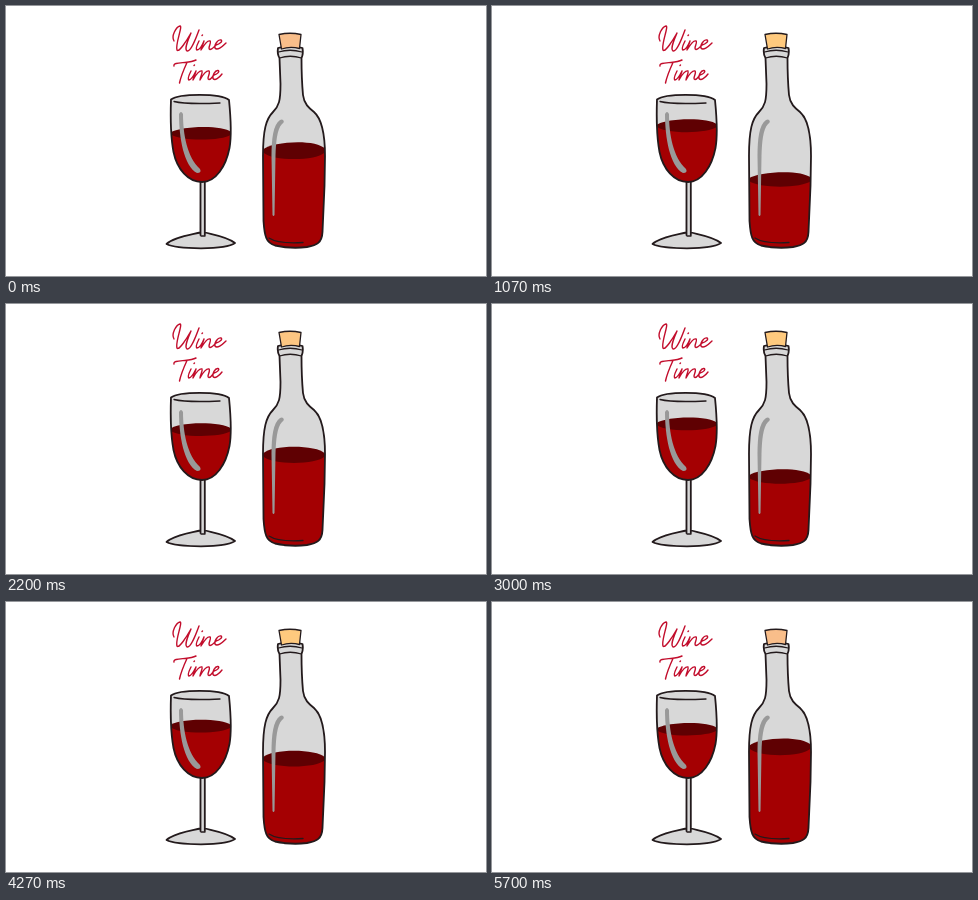
An HTML page that plays this animation: 480x270 px, repeating every 5730 ms.

```html
<!DOCTYPE html>
<html lang="en">
<head>
<meta charset="utf-8">
<title>Wine Time</title>
<style>
  html, body { margin: 0; width: 100%; height: 100%; overflow: hidden; background: #fff; }
  svg { display: block; width: 100vw; height: 100vh; }
  .glass { fill: #d8d8d8; }
  .wine { fill: #a40002; }
  .surface { fill: #5f0002; }
  .ink { fill: none; stroke: #231a1c; stroke-width: 1.8; }
  .thin { stroke-width: 1.3; }
  .shine { fill: #999; }
  .lettering { fill: none; stroke: #c20d2c; stroke-width: 1.4; }
  path { stroke-linecap: round; stroke-linejoin: round; }
</style>
</head>
<body>
<svg viewBox="0 0 480 270" role="img" aria-label="Wine Time">
  <defs>
    <path id="bowl" d="M165 93.500C173 87.500 214 87 223 94C224.500 109 226 128 223.500 142C220 160 210 176 196 176C182 176 171 163 167.500 146C164.500 130 164.500 108 165 93.500Z"/>
    <path id="bottle" d="M272 42Q284 38.500 296.500 42Q297.500 48 295.500 52C295.500 65 296 78 297 89C298 98 303 102 308 106C316 113 319 128 319 150L318.500 180L316.500 226C316 237 311 239 301 241Q285 243 269 239.500C260 237 258.500 230 257.500 215L257 150C257 124 260 113 267 106C273 100 274.500 95 274.500 78L273.500 52Q271 48 272 42Z"/>
    <clipPath id="inBowl"><use href="#bowl"/></clipPath>
    <clipPath id="inBottle"><use href="#bottle"/></clipPath>
  </defs>

  <g class="lettering">
    <path d="M168 35C165 30 170 21 174 20C177 20 169 38 171 44C173 47 181 34 185 27C182 34 178 43 181 45C185 46 190 32 193 24"/>
    <path d="M193 35C191 39 189 43 191 44C193 44 196 40 198 35C197 39 195 42 195 44C198 39 202 34 204 35C206 36 201 43 204 43.500C206 43.500 208 41 210 39C214 38 217 35 215 34C212 33 208 39 209 42C211 45 216 41 220 37"/>
    <path d="M196 29.500L196.500 29"/>
    <path d="M168 60C167 57 173 57 179 56.500C184 56 188 55 190 54M181 56.500C178 63 175 70 173.500 77"/>
    <path d="M185 65C183 69 181 73 183 74C185 74 188 69 190 65C189 69 187 72 187 74C190 68 194 64 196 65C197 67 194 71 194 74C197 68 201 64 203 65C205 67 200 73 203 73.500C205 73.500 206 71 208 69C212 68 214 65 212 64.500C209 64 206 70 207 72.500C209 75 213 72 216 68"/>
    <path d="M188 59.500L188.500 59"/>
  </g>

  <path class="glass" d="M194 176H199L199.500 226C209 229 222 231 229 237Q222 242 195 242.500Q168 242 160.500 238C168 231 184 229 193.500 226Z"/>
  <path class="ink" d="M194.500 176V229M198.800 176V229M194.500 226.500C184 229 168 231 160.500 238Q168 242 195 242.300Q222 242 229 237C222 231 209 229 199 226.500"/>
  <path class="ink thin" d="M195 230H199"/>
  <use href="#bowl" class="glass"/>
  <g clip-path="url(#inBowl)">
    <path id="glassWine" class="wine"/>
    <path id="glassTop" class="surface"/>
  </g>
  <path class="shine" d="M173 108Q175 104 177 108C177 128 181 151 194 163Q196 167 191 167C178 160 173 132 173 108Z"/>
  <use href="#bowl" class="ink"/>
  <path class="ink thin" d="M168 95.500Q180 98.500 214 97"/>

  <use href="#bottle" class="glass"/>
  <g clip-path="url(#inBottle)">
    <path id="bottleWine" class="wine"/>
    <path id="bottleTop" class="surface"/>
  </g>
  <path class="shine" d="M277 114Q279 116 276 118C271 123 270 136 269.500 150L268.500 209Q267.500 211 266.500 209L265.500 150C265.500 133 267 119 274 114Q276 113 277 114Z"/>
  <use href="#bottle" class="ink"/>
  <path class="ink thin" d="M272.500 46Q284 42.500 296 46M273.500 52Q284 48.500 295.500 52M263 232Q272 238 297 236.500"/>
  <path id="cork" class="ink thin" d="M273 28.500Q284 26 295 28.500L293.500 42.500Q284 40 275.500 43Z"/>
</svg>
<script>
const LOOP = 5730, CYCLE = LOOP / 3;
const STARTS = [0, 70, 100, 130, 170];
const get = id => document.getElementById(id);
const mix = (a, b, s) => a + (b - a) * s;

// Five uneven steps every 200 ms: 25 pictures a second on a 30 Hz clock.
function steppedTime(t) {
  const base = Math.floor(t / 200) * 200;
  return base + STARTS.filter(s => s <= t - base).length * 40 - 40;
}

function setLiquid(name, left, right, y, depth, tilt, bottom) {
  const w = right - left, a = left + w * 0.08, b = right - w * 0.08, h = depth * 1.33;
  get(name + 'Top').setAttribute('d',
    `M${left} ${y}C${a} ${y - h + tilt} ${b} ${y - h - tilt} ${right} ${y}` +
    `C${b} ${y + h} ${a} ${y + h} ${left} ${y}Z`);
  get(name + 'Wine').setAttribute('d', `M${left} ${y}H${right}V${bottom}H${left}Z`);
}

function draw(t) {
  const angle = 2 * Math.PI * steppedTime(t) / CYCLE;
  const poured = (1 - Math.cos(angle)) / 2;
  const sway = Math.max(0, Math.cos(2 * angle));
  setLiquid('bottle', 256, 320, mix(144.7, 174, poured), mix(8.4, 7.2, poured), 2 * sway, 245);
  setLiquid('glass', 164, 226, mix(127.3, 119.5, poured), mix(6.3, 6.5, poured), 1.2 * sway, 178);
  const warm = Math.min(1, poured * 3);
  get('cork').style.fill = `rgb(${mix(249, 255, warm)},${mix(190, 202, warm)},${mix(138, 126, warm)})`;
}

const start = performance.now();
function tick() {
  draw((performance.now() - start) % LOOP);
  requestAnimationFrame(tick);
}
tick();
</script>
</body>
</html>
```
